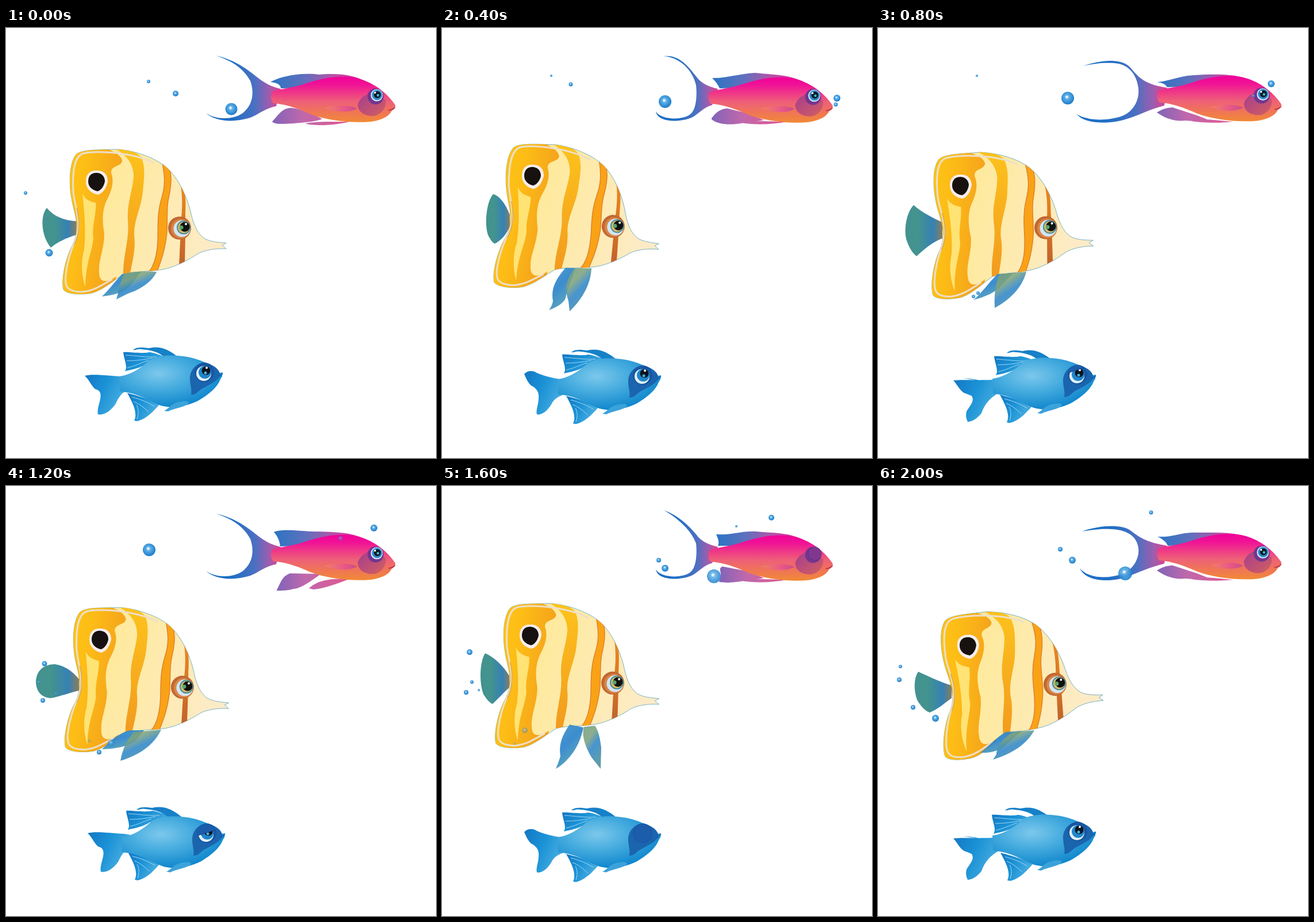
Recreate the animation shown at these times as an HTML page. Size 748 by 748 pixels, loop 2400 ms.

```html
<!DOCTYPE html>
<html lang="en">
<head>
<meta charset="utf-8">
<title>Three fish</title>
<style>
  html, body { margin: 0; width: 100%; height: 100%; overflow: hidden; background: #fff; }
  svg { display: block; width: 100%; height: 100%; }
</style>
</head>
<body>
<svg viewBox="0 0 748 748">
  <defs>
    <linearGradient id="pinkSkin" x2="0" y2="1"><stop stop-color="#f00098"/><stop offset=".18" stop-color="#f01496"/><stop offset=".55" stop-color="#ee6078"/><stop offset="1" stop-color="#f18a35"/></linearGradient>
    <linearGradient id="pinkTailFill"><stop offset=".35" stop-color="#1f6fc4"/><stop offset=".65" stop-color="#4a70c2"/><stop offset=".85" stop-color="#a05cae"/><stop offset="1" stop-color="#e0408e"/></linearGradient>
    <linearGradient id="dorsalFill"><stop stop-color="#2a74c4"/><stop offset=".35" stop-color="#5f70bd"/><stop offset=".65" stop-color="#b453a8"/><stop offset="1" stop-color="#ee1c96"/></linearGradient>
    <linearGradient id="bellyFill"><stop stop-color="#8064b8"/><stop offset=".4" stop-color="#c068ac"/><stop offset="1" stop-color="#e2588e"/></linearGradient>
    <linearGradient id="sideFin"><stop stop-color="#f08068"/><stop offset=".6" stop-color="#ea5886"/><stop offset="1" stop-color="#c84c88"/></linearGradient>
    <linearGradient id="cheek" x2="1" y2="1"><stop stop-color="#a63c90"/><stop offset="1" stop-color="#d2605f"/></linearGradient>
    <linearGradient id="cream" x2="1" y2=".25"><stop stop-color="#ffe98c"/><stop offset=".5" stop-color="#feeaa6"/><stop offset="1" stop-color="#fdebc6"/></linearGradient>
    <linearGradient id="gold" x2="1" y2=".3"><stop stop-color="#ffc814"/><stop offset=".5" stop-color="#fdbd16"/><stop offset="1" stop-color="#f4a11c"/></linearGradient>
    <linearGradient id="amber" x2="0" y2="1"><stop stop-color="#fdc31c"/><stop offset="1" stop-color="#f29a1e"/></linearGradient>
    <linearGradient id="rust" x2="0" y2="1"><stop stop-color="#ee8a1c"/><stop offset="1" stop-color="#c0622c"/></linearGradient>
    <linearGradient id="tealTail"><stop stop-color="#43928f"/><stop offset=".35" stop-color="#43938f"/><stop offset=".75" stop-color="#3581b4"/><stop offset="1" stop-color="#8a7d5c"/></linearGradient>
    <linearGradient id="finBlue" x1=".2" x2=".8" y2="1"><stop stop-color="#3e94c4"/><stop offset=".4" stop-color="#2b82cc"/><stop offset=".65" stop-color="#3f93bf"/><stop offset="1" stop-color="#5d9a92"/></linearGradient>
    <linearGradient id="finOlive" x2=".6" y2="1"><stop stop-color="#6f9f84"/><stop offset=".35" stop-color="#7fa37c"/><stop offset=".6" stop-color="#2f86ca"/><stop offset="1" stop-color="#4a8f9e"/></linearGradient>
    <radialGradient id="blueSkin" cx=".38" cy=".35" r=".65"><stop stop-color="#7cc8ec"/><stop offset=".45" stop-color="#48addf"/><stop offset="1" stop-color="#1087cd"/></radialGradient>
    <linearGradient id="blueFin" x2="1" y2=".4"><stop stop-color="#1377c4"/><stop offset=".5" stop-color="#1b92d6"/><stop offset="1" stop-color="#4aaee0"/></linearGradient>
    <radialGradient id="bubbleFill" cx=".45" cy=".42" r=".6"><stop stop-color="#b4dcf4"/><stop offset=".35" stop-color="#55aae4"/><stop offset="1" stop-color="#1b78c6"/></radialGradient>
    <clipPath id="stripedEdge"><use href="#stripedShape"/></clipPath>
    <clipPath id="blueEyeEdge"><circle cx="345" cy="599" r="16"/></clipPath>
  </defs>

  <g id="pink">
    <path id="pinkDorsal" fill="url(#dorsalFill)"/>
    <path id="pinkBelly" fill="url(#bellyFill)"/>
    <path id="pinkTail" fill="url(#pinkTailFill)"/>
    <g id="pinkBody">
      <path fill="url(#pinkSkin)" d="M463 111C475 106 500 104 520 97C560 84 595 80 625 92C650 102 668 120 677 134C678 138 676 141 671 144C667 153 655 160 635 163C600 166 560 161 530 150C510 141 490 133 465 131C460 125 460 117 463 111Z"/>
      <path fill="url(#sideFin)" d="M553 139C570 135 595 132 611 140C596 148 575 147 553 139Z"/>
      <path fill="url(#cheek)" d="M612 133C615 122 628 112 640 114L660 125C663 140 650 153 638 153C622 153 612 145 612 133Z"/>
      <path fill="none" stroke="#b22c4e" stroke-width="1.5" d="M665 143C671 143 673 141 677 138"/>
      <circle cx="643" cy="119" r="14" fill="#73358f"/>
      <g id="pinkEye">
        <circle cx="645" cy="117" r="10.5" fill="#d6e9f6"/>
        <circle cx="645.5" cy="116.5" r="9" fill="#2b8ccb"/>
        <circle cx="646" cy="116" r="6" fill="#101820"/>
        <circle cx="647" cy="117" r="2.2" fill="#39bcd4"/>
        <circle cx="642" cy="112.500" r="1.700" fill="#fff"/>
      </g>
      <circle id="pinkLid" cx="646" cy="117" r="11.500" fill="#80388f" stroke="#592c80" stroke-width=".8"/>
    </g>
  </g>

  <g id="striped">
    <path id="stripedTail" fill="url(#tealTail)"/>
    <g id="stripedBody">
      <path id="stripedShape" fill="url(#cream)" stroke="#5ba3bd" stroke-width=".8" d="M113 290C109 260 112 232 122 220C132 211 160 212 195 211C235 215 265 230 280 243C300 262 312 288 320 315C325 337 330 355 345 366C355 372 370 373 383 374L376 378L383 384C362 383 345 387 335 392C318 403 305 410 285 417C260 425 225 422 205 428C190 437 170 455 150 461C130 465 105 463 100 455C96 440 102 408 112 385C120 370 124 358 123 340C121 322 115 308 113 290Z"/>
      <g clip-path="url(#stripedEdge)">
        <path fill="url(#gold)" d="M90 200L165 205C180 213 198 217 202 230C202 242 182 238 183 252C189 268 183 285 175 300C166 320 168 340 171 358C171 385 160 405 162 425C162 441 172 446 192 432L180 475L80 475Z"/>
        <path fill="#ffe374" d="M133 288C137 298 146 302 156 304C158 320 149 345 152 365C150 390 139 405 138 450C131 430 130 405 136 385C140 350 135 310 133 288Z"/>
        <path fill="url(#amber)" d="M188 209C213 222 222 240 222 258C220 285 210 305 212 335C215 370 203 395 204 430L216 426C220 405 226 385 223 360C222 335 236 310 238 285C240 262 243 245 236 226C230 217 215 211 188 209Z"/>
        <path fill="#faa216" stroke="#df822c" stroke-width="1.500" d="M272 235C277 260 277 275 271 295C262 325 265 350 264 370C263 395 258 415 246 427L262 425C270 405 277 385 280 355C281 325 279 310 284 290C288 270 288 255 284 244Z"/>
        <path fill="url(#rust)" d="M303 268C307 290 307 310 305 330L303 370L301 415L311 411L312 360V320C313 300 312 290 309 279Z"/>
        <path fill="none" stroke="#ecdfc9" stroke-width="3" d="M258 235C220 216 160 213 135 218C120 222 115 245 117 285C120 310 127 325 126 348C122 370 107 395 104 430C102 450 106 458 130 459C150 458 163 450 185 437"/>
        <path fill="none" stroke="#d5a55a" stroke-width="1.500" d="M123 313C130 340 127 360 119 377"/>
      </g>
      <path fill="#f7eeec" d="M139 267C139 253 147 247 159 248C172 248 177 257 177 267C174 281 167 288 160 290C149 288 139 280 139 267Z"/>
      <path fill="#17110f" d="M143 267C143 256 150 251 159 252C168 253 172 260 172 267C170 277 164 283 159 284C150 282 143 276 143 267Z"/>
      <circle cx="302" cy="348" r="20" fill="#c26832"/>
      <circle cx="304" cy="349" r="17" fill="#d98545"/>
      <circle cx="306" cy="349" r="14.500" fill="#d3e5f2"/>
      <circle cx="309" cy="347" r="12" fill="#4f8b96"/>
      <circle cx="309" cy="347" r="10" fill="#d5bc68"/>
      <circle cx="311" cy="346" r="8.500" fill="#10120f"/>
      <circle cx="305" cy="347" r="3.500" fill="#5aa56b"/>
      <circle cx="313" cy="341" r="2" fill="#fff"/>
    </g>
    <path id="backFin" fill="url(#finBlue)" opacity=".92"/>
    <path id="frontFin" fill="url(#finOlive)" opacity=".88"/>
  </g>

  <g id="blue">
    <path id="blueTail" fill="url(#blueFin)"/>
    <g id="blueCrest" fill="url(#blueFin)">
      <path d="M204 564C215 563 235 567 250 564C262 566 270 570 282 574L245 584C235 591 220 594 207 597C212 588 206 580 204 564Z"/>
      <path fill="none" stroke="#9ed6f0" d="M208 569C225 570 245 573 262 572M210 579C225 579 240 577 255 574M211 591C225 588 235 582 248 578"/>
    </g>
    <path id="blueStrand" fill="#1680c8" d="M221 560C228 554 240 556 248 557C270 552 285 561 300 573L276 573C264 562 248 560 237 559C230 557 226 561 221 560Z"/>
    <g id="blueAnal" fill="url(#blueFin)">
      <path d="M211 635C222 638 245 643 267 655C258 665 245 680 228 684L223 683C229 670 222 655 211 635Z"/>
      <path fill="none" stroke="#a5d8f0" d="M219 642C235 646 248 652 258 658M222 650C233 654 242 662 248 668M228 680C231 672 231 663 227 656"/>
    </g>
    <g id="blueBody">
      <path fill="url(#blueSkin)" d="M197 606C215 604 235 592 248 579C265 568 290 568 315 572C340 577 362 587 372 600L377 599L376 606L373 611C368 625 352 638 335 648C312 659 290 662 270 657C250 650 235 636 198 632Z"/>
      <path fill="#1b64ae" d="M320 610C320 592 335 580 350 583C365 588 374 597 372 606C366 616 350 622 340 628C332 634 330 638 322 638C324 628 320 622 320 610Z"/>
      <path fill="none" stroke="#17529b" stroke-width="1.500" d="M370 606L377 601"/>
      <path fill="#3ba2da" d="M275 666C284 662 285 655 298 651C310 648 318 648 318 653C310 660 290 662 282 667Z"/>
      <circle cx="345" cy="599" r="17" fill="#1757a2"/>
      <g clip-path="url(#blueEyeEdge)">
        <circle cx="344" cy="601" r="13" fill="#e2f1fb"/>
        <circle cx="346" cy="599" r="11" fill="#1f86cb"/>
        <circle cx="348" cy="596" r="7.500" fill="#0c1420"/>
        <circle cx="347" cy="600" r="2.500" fill="#41b6de"/>
        <circle cx="349" cy="591" r="2" fill="#fff"/>
        <path id="blueLid" fill="#1b5dab" stroke="#154a92" d="M315 540H375V583H315Z"/>
      </g>
    </g>
  </g>
  <g id="bubbles" fill="url(#bubbleFill)"></g>
</svg>
<script>
const POSE_MS = 400;
const $ = id => document.getElementById(id);

// One outline for each of the six poses.
const outlines = {
  pinkTail: (() => {
    const sweep = "M365 48C400 56 420 72 440 88C452 97 462 102 478 106L470 136C450 140 440 150 425 156C395 165 365 163 348 148C365 160 395 160 412 148C430 133 432 112 425 92C412 68 390 56 365 48Z";
    const lower = "C450 95 460 101 480 106L470 134C455 138 448 148 436 155C415 165 375 165 372 145C380 160 418 161 432 150C442 142 444 120 442 100";
    return [
      sweep,
      "M386 49C412 46 428 66 442 84" + lower + "C438 80 420 52 386 49Z",
      "M357 66C390 55 425 52 440 70C455 88 465 98 503 104L498 135C470 142 455 152 430 159C405 167 360 168 346 150C365 162 400 162 425 153C445 145 455 125 453 105C450 80 435 62 410 61C390 60 375 62 357 66Z",
      sweep,
      "M386 42C412 52 428 68 442 84" + lower + "C434 78 412 57 386 42Z",
      "M355 79C385 68 425 66 440 78C458 92 470 98 503 104L498 135C470 142 455 150 430 159C405 167 362 168 351 143C365 161 400 162 425 153C445 145 455 125 453 108C450 85 430 76 405 75C390 74 375 76 355 79Z"
    ];
  })(),
  pinkDorsal: [
    "M460 94C480 82 520 77 545 81C580 78 605 82 626 93L520 104L478 105C478 98 470 95 460 94Z",
    "M470 87C490 88 515 80 545 78C570 81 600 80 628 93L520 104L483 105C480 98 475 92 470 87Z",
    "M485 94C505 93 525 83 550 82C590 80 620 79 650 91L540 102L503 103C500 97 493 95 485 94Z",
    "M466 80C480 74 510 78 530 79C575 80 600 80 626 93L520 104L477 105C476 95 472 87 466 80Z",
    "M477 84C500 86 520 78 545 79C575 82 600 80 628 93L520 104L480 104C483 97 480 92 477 84Z",
    "M486 88C510 90 530 80 550 81C590 81 620 79 650 91L540 102L504 104C502 98 495 92 486 88Z"
  ],
  pinkBelly: (() => {
    const rear = "L530 148L560 160C545 164 530 162 520 166C500 169 480 168 ";
    const front = "M520 165C545 160 575 163 600 163C575 168 545 169 520 165Z";
    const tucked = "M485 147C495 141 500 139 512 138L555 152L580 162C565 160 550 163 535 161C515 163 500 157 485 147ZM545 162C570 156 590 161 618 163C590 166 565 165 545 162Z";
    return [
      "M463 163C475 150 480 140 495 139C515 140 540 152 550 158C540 163 520 164 500 166C480 167 468 168 463 163ZM520 166C540 162 570 163 597 163C580 168 540 172 520 166Z",
      "M469 157C476 147 485 140 497 140" + rear + "469 159Z" + front,
      tucked,
      "M471 181C478 168 480 157 494 152L548 153C530 165 515 178 500 179C490 182 480 182 471 182ZM527 178C540 166 560 160 597 162C575 170 555 178 535 180Z",
      "M482 166C490 150 478 144 488 140" + rear + "482 166Z" + front,
      tucked
    ];
  })(),
  stripedTail: [
    "M123 336C105 335 85 330 71 313C60 325 60 360 78 382C90 372 105 365 122 360Z",
    "M118 325C110 305 100 292 89 289C78 300 73 340 80 360C84 368 88 374 92 375C102 370 112 360 118 345Z",
    "M112 338C95 330 75 320 62 308C50 320 44 350 50 370C55 385 62 393 67 397C80 385 95 372 112 366Z",
    "M127 336C118 325 105 313 85 310C65 310 52 322 52 342C53 358 62 368 78 369C95 366 115 358 127 356Z",
    "M117 330C108 315 92 298 75 291C66 305 64 340 72 362C78 372 84 378 88 379C98 370 108 358 118 350Z",
    "M129 347C110 342 90 332 70 323C62 335 62 355 68 372C75 385 85 393 90 394C105 388 115 378 128 369Z"
  ],
  backFin: [
    "M202 428C190 440 180 455 167 467C185 465 205 460 215 450L235 424Z",
    "M215 417C195 440 190 455 193 475C192 482 188 488 186 491C200 485 215 478 216 465C220 450 228 430 232 418Z",
    "M208 428C195 440 180 462 166 473C185 468 205 460 215 448L235 426Z",
    "M215 425C195 430 180 445 167 458C185 457 215 455 228 440L240 425Z",
    "M222 415C208 435 203 450 206 470C203 480 200 487 198 492C215 482 238 460 246 420Z",
    "M222 428C205 438 190 455 178 464C195 465 215 460 225 448L250 426Z"
  ],
  frontFin: [
    "M205 428C200 442 194 455 195 461L192 472L212 462C235 455 255 440 262 424C240 423 220 423 205 428Z",
    "M230 418C215 440 213 455 220 475L222 493C235 480 258 455 260 418Z",
    "M212 428C204 445 202 460 203 487C225 475 250 455 258 424Z",
    "M222 428C212 440 203 455 199 478C225 470 255 455 270 424Z",
    "M247 419C242 435 250 455 260 472L276 492L277 455C275 440 272 425 266 417Z",
    "M235 428C218 438 206 455 206 467L200 476C225 468 255 455 272 425Z"
  ],
  blueTail: (() => {
    const wide = "M137 605C150 601 175 605 200 606L212 608L208 632C200 635 195 645 190 655C180 668 170 674 160 672C158 665 162 655 164 645C166 635 163 630 155 628C148 622 145 612 137 605Z";
    const raised = "M143 602C148 596 158 595 165 600C180 606 195 610 216 612L214 637C200 642 195 645 190 655C182 668 172 674 165 672C163 664 168 655 168 645C170 632 162 625 155 622C148 615 146 608 143 602Z";
    const low = "M131 613C150 611 175 614 214 611L212 634C195 642 185 655 180 670C172 680 163 685 156 685C153 678 152 672 155 665C162 655 168 648 163 640C155 636 150 636 146 632C140 626 136 618 131 613Z";
    const rays = "M148 609C165 610 180 613 197 617M160 622C175 619 185 620 198 621M172 650C180 638 188 630 199 625";
    return [wide, raised, low, wide, raised, low].map(d => d + rays);
  })()
};

// [x, y, degrees] for each pose; turns are about the pivot.
const pivots = { stripedBody: "157 267" };
const moves = {
  pinkBody: [[0, 0], [2.500, .8], [24.500, -1.500], [0, 0], [2.500, .8], [24.500, -1.500]],
  stripedBody: [[0, 0], [0, -10, 2.850], [-14, 7, -2.950], [6, 0, .8], [-4, -7, .7], [-1, 11, -5.400]],
  blueBody: [[0, 0], [4, 5], [2, 4], [4, 5], [4, 5], [2, 2]],
  blueCrest: [[0, 0], [5, 4], [-2, 7], [5, 1], [5, 4], [-6, 8]],
  blueStrand: [[0, 0], [4, 4], [3, 5], [6, 3], [4, 4], [0, 4]],
  blueAnal: [[0, 0], [5, 5], [1, 3], [1, 2], [5, 5], [2, 3]],
  blueTail: [[0, 0], [0, 0], [0, 0], [5, -1], [0, 0], [0, 0]]
};
const lidDrop = [0, 4, 8, 15, 40, 0];

// [x, y, radius, opacity]
const bubbles = [
  [[248, 93, 3], [295, 114, 5], [392, 141, 10.500], [34, 287, 3], [75, 391, 6.500]],
  [[190, 83, 2], [224, 98, 3.500], [388, 128, 11], [687, 122, 6], [685, 133, 3.500]],
  [[172, 83, 2], [330, 122, 11], [684, 97, 6], [174, 461, 3], [166, 467, 3], [653, 118, 3, .5]],
  [[249, 111, 11], [640, 73, 6], [582, 91, 4, .4], [67, 309, 4.500], [64, 373, 4], [57, 341, 2.500, .6],
   [87, 361, 2, .6], [162, 463, 4], [183, 447, 6, .6], [145, 443, 2.500, .4]],
  [[573, 55, 5], [512, 70, 2], [377, 129, 4], [388, 143, 6], [473, 157, 12, .85], [48, 289, 5],
   [52, 341, 3], [64, 355, 2], [42, 359, 4], [144, 425, 5, .4], [126, 448, 2, .4]],
  [[475, 46, 3.500], [317, 110, 4], [338, 129, 6], [430, 152, 12, .9], [39, 314, 3], [37, 337, 4],
   [61, 385, 4], [100, 404, 6]]
];

function bubbleMarkup([x, y, r, opacity = 1]) {
  return `<g opacity="${opacity}"><circle cx="${x}" cy="${y}" r="${r}"/>` +
    `<circle cx="${x - r * .15}" cy="${y - r * .2}" r="${r * .2}" fill="#e4f4fd"/></g>`;
}

function showPose(pose) {
  for (const id in outlines) $(id).setAttribute("d", outlines[id][pose]);
  for (const id in moves) {
    const [x, y, turn = 0] = moves[id][pose];
    $(id).setAttribute("transform", `translate(${x} ${y}) rotate(${turn} ${pivots[id] || "0 0"})`);
  }
  const shut = pose === 4;
  $("pinkEye").style.display = shut ? "none" : "";
  $("pinkLid").style.display = shut ? "" : "none";
  $("blueLid").setAttribute("transform", `rotate(-18 345 599) translate(0 ${lidDrop[pose]})`);
  $("bubbles").innerHTML = bubbles[pose].map(bubbleMarkup).join("");
}

const start = performance.now();
let shown = -1;
function tick() {
  const pose = Math.floor((performance.now() - start) / POSE_MS) % bubbles.length;
  if (pose !== shown) showPose(shown = pose);
  requestAnimationFrame(tick);
}
tick();
</script>
</body>
</html>
```
